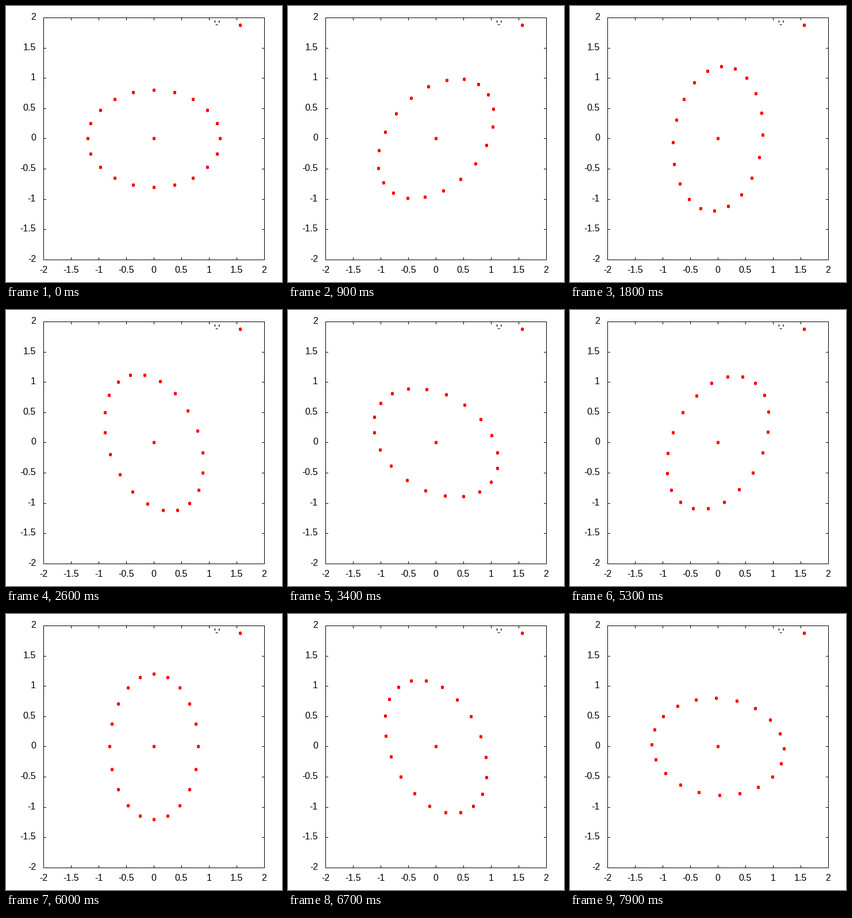
Write a matplotlib script that moves like this. It is 480x480 px and loops after 8000 ms.

```python
import numpy as np
import matplotlib.pyplot as plt
from matplotlib.animation import FuncAnimation
from matplotlib.collections import PolyCollection
from matplotlib.patches import Rectangle

SIZE, DPI = 480, 96
FRAMES, INTERVAL = 80, 100
LEFT, RIGHT, TOP, BOTTOM = 65, 449, 20, 441
TICK = 4
KEY_X, KEY_Y = 407, 33
DROP = 4  # from a mark's centre to the baseline of its label
STRAIN = 0.2
PHASE_STEP = np.pi / 20

plt.rcParams["font.family"] = "Liberation Sans"
plt.rcParams["font.size"] = 12

fig = plt.figure(figsize=(SIZE / DPI, SIZE / DPI), dpi=DPI, facecolor="white")
ax = fig.add_axes([0, 0, 1, 1])
ax.set_xlim(0, SIZE)
ax.set_ylim(SIZE, 0)
ax.axis("off")


def to_pixel(x, y):
    """Map plot values in [-2, 2] to whole pixels."""
    px = LEFT + (np.asarray(x) + 2) * (RIGHT - LEFT) / 4
    py = BOTTOM - (np.asarray(y) + 2) * (BOTTOM - TOP) / 4
    return np.floor(px + 0.5), np.ceil(py - 0.5 - 1e-9)


def bar(x0, y0, x1, y1):
    """Fill the pixels from (x0, y0) to (x1, y1), ends included."""
    ax.add_patch(Rectangle((x0, y0), x1 - x0 + 1, y1 - y0 + 1,
                           fc="black", lw=0, antialiased=False))


def label(x, y, text, align):
    ax.text(x, y, text, ha=align, va="baseline")


def draw_axes():
    for x in (LEFT, RIGHT):
        bar(x, TOP, x, BOTTOM)
    for y in (TOP, BOTTOM):
        bar(LEFT, y, RIGHT, y)
    for v in np.arange(-2, 2.5, 0.5):
        px, py = to_pixel(v, v)
        bar(px, TOP, px, TOP + TICK)
        bar(px, BOTTOM - TICK, px, BOTTOM)
        bar(LEFT, py, LEFT + TICK, py)
        bar(RIGHT - TICK, py, RIGHT, py)
        label(px, 464, f"{v:g}", "center")
        label(52, py + DROP, f"{v:g}", "right")
    label(372, KEY_Y + DROP, "'-'", "right")


# Outline of one small dot, relative to its central pixel:
# a 5 by 5 block with one extra pixel above and below
DOT = np.array([(0, -3), (1, -3), (1, -2), (3, -2), (3, 3), (1, 3), (1, 4),
                (0, 4), (0, 3), (-2, 3), (-2, -2), (0, -2)])


def dots(px, py):
    centers = np.column_stack([px, py])
    return centers[:, None, :] + DOT


angles = np.arange(20) * np.pi / 10
ring = np.vstack([np.cos(angles), np.sin(angles)])

draw_axes()
cx, cy = to_pixel(0, 0)
style = dict(facecolors="red", linewidths=0, antialiaseds=False)
ax.add_collection(PolyCollection(dots([cx, KEY_X], [cy, KEY_Y]), **style))
moving = ax.add_collection(PolyCollection(dots(*to_pixel(*ring)), **style))


def update(i):
    c, s = STRAIN * np.cos(i * PHASE_STEP), STRAIN * np.sin(i * PHASE_STEP)
    x, y = np.array([[1 + c, s], [s, 1 - c]]) @ ring
    moving.set_verts(dots(*to_pixel(x, y)))
    return (moving,)


anim = FuncAnimation(fig, update, frames=FRAMES, interval=INTERVAL,
                     repeat=True, repeat_delay=0)
plt.show()
```
